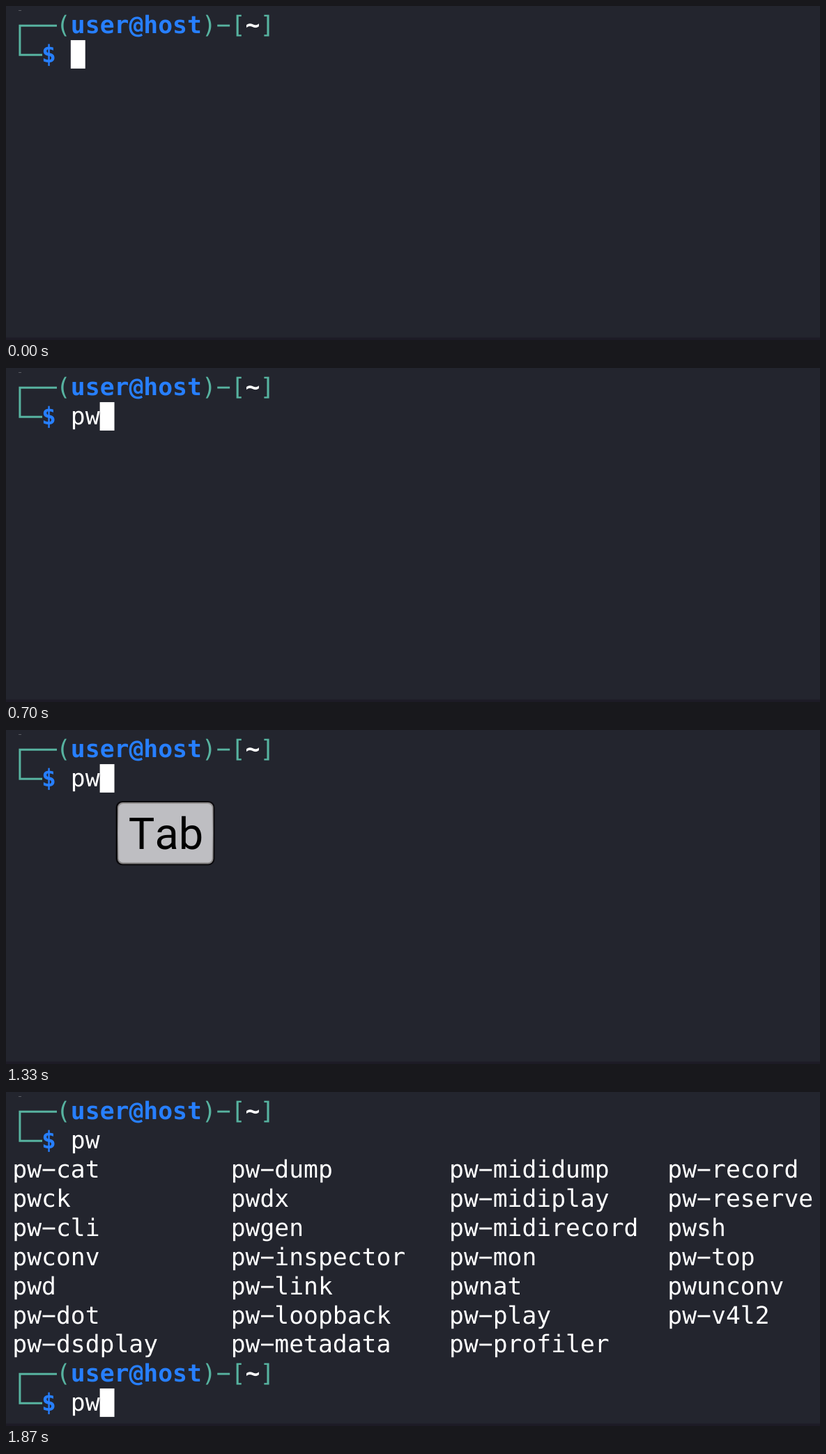
An HTML page that plays this animation: 1168x480 px, repeating every 3210 ms.

```html
<!DOCTYPE html>
<html lang="en">
<head>
<meta charset="utf-8">
<title>Tab completion</title>
<style>
  html, body { margin: 0; width: 100%; height: 100%; overflow: hidden; background: #23252e; }
  svg { display: block; width: 100%; height: 100%; }
  text { white-space: pre; text-rendering: geometricPrecision; }
  .term { font: 34.7px "DejaVu Sans Mono", monospace; fill: #fff; }
  .term .teal { fill: #57b3a0; }
  .term .blue { fill: #277fff; font-weight: bold; }
  .term .bold { font-weight: bold; }
  .lines { fill: none; stroke: #57b3a0; stroke-width: 3; }
  .key { font: 63px Roboto, sans-serif; font-kerning: none; fill: #000; }
</style>
</head>
<body>
<svg id="stage" viewBox="0 0 1168 480" preserveAspectRatio="none"></svg>
<script>
const LOOP = 3210;
const CELL = 20.89, PITCH = 41.89, LEFT = 9.3, TOP = 7.1, ASCENT = 32.2;

const COLUMNS = [
  "pw-cat pwck pw-cli pwconv pwd pw-dot pw-dsdplay",
  "pw-dump pwdx pwgen pw-inspector pw-link pw-loopback pw-metadata",
  "pw-mididump pw-midiplay pw-midirecord pw-mon pwnat pw-play pw-profiler",
  "pw-record pw-reserve pwsh pw-top pwunconv pw-v4l2"
];

const colX = col => LEFT + col * CELL;
const rowY = row => TOP + row * PITCH;

// The terminal face has a wide dash, so hyphens are set as minus signs.
function put(str, col, row, cls = "") {
  return `<text class="${cls}" x="${colX(col)}" y="${rowY(row) + ASCENT}">${str.replace("-", "\u2212")}</text>`;
}

function prompt(row) {
  const y = rowY(row);
  return `<path class="lines" d="M19.9 ${y + 42}V${y + 21.1}H73M19.9 ${y + 42}V${y + 63.1}H52"/>` +
    put("(", 3, row, "teal") + put("user@host", 4, row, "blue") +
    put(")-[", 13, row, "teal") + put("~", 16, row, "bold") +
    put("]", 17, row, "teal") + put("$", 2, row + 1, "blue");
}

const listing = COLUMNS.map((names, c) =>
  names.split(" ").map((name, r) => put(name, c * 15, r + 2)).join("")).join("");

document.getElementById("stage").innerHTML = `
  <defs>
    <linearGradient id="bevel" x2="0" y2="1">
      <stop offset="0" stop-color="#8f8c8c"/>
      <stop offset=".5" stop-color="#aaa9ac"/>
      <stop offset="1" stop-color="#858383"/>
    </linearGradient>
  </defs>
  <rect width="1168" height="480" fill="#23252e"/>
  <rect y="476.5" width="1168" height="3.5" fill="#1d1b26"/>
  <rect x="18" y="6" width="4" height="1" fill="#5b5d64"/>
  <g class="term">
    ${prompt(0)}
    <text id="typed" x="${colX(4)}" y="${rowY(1) + ASCENT}"></text>
    <g id="list">${listing}${prompt(9)}${put("pw", 4, 10)}</g>
    <rect id="cursor" width="${CELL}" height="40.8"/>
  </g>
  <g id="tab">
    <rect x="157.5" y="102" width="142" height="92.5" rx="9.5" fill="#0b0a0d"/>
    <rect x="160" y="104" width="137.5" height="88.5" rx="7.5" fill="url(#bevel)"/>
    <rect x="161.8" y="106" width="134" height="84.5" rx="6" fill="#bebec2"/>
    <text class="key" x="175.8" y="171">Tab</text>
  </g>`;

const [typed, list, cursor, tab] =
  ["typed", "list", "cursor", "tab"].map(id => document.getElementById(id));
const show = (el, on) => el.setAttribute("visibility", on ? "visible" : "hidden");

function render(t) {
  const count = t < 620 ? 0 : t < 700 ? 1 : 2;
  const listed = t >= 1480;
  typed.textContent = "pw".slice(0, count);
  cursor.setAttribute("x", colX(4 + count));
  cursor.setAttribute("y", rowY(listed ? 10 : 1) + 0.1);
  show(list, listed);
  show(tab, (t >= 780 && t < 1090) || (t >= 1330 && t < 1870));
}

const start = performance.now();
function tick() {
  render((performance.now() - start) % LOOP);
  requestAnimationFrame(tick);
}
tick();
</script>
</body>
</html>
```
